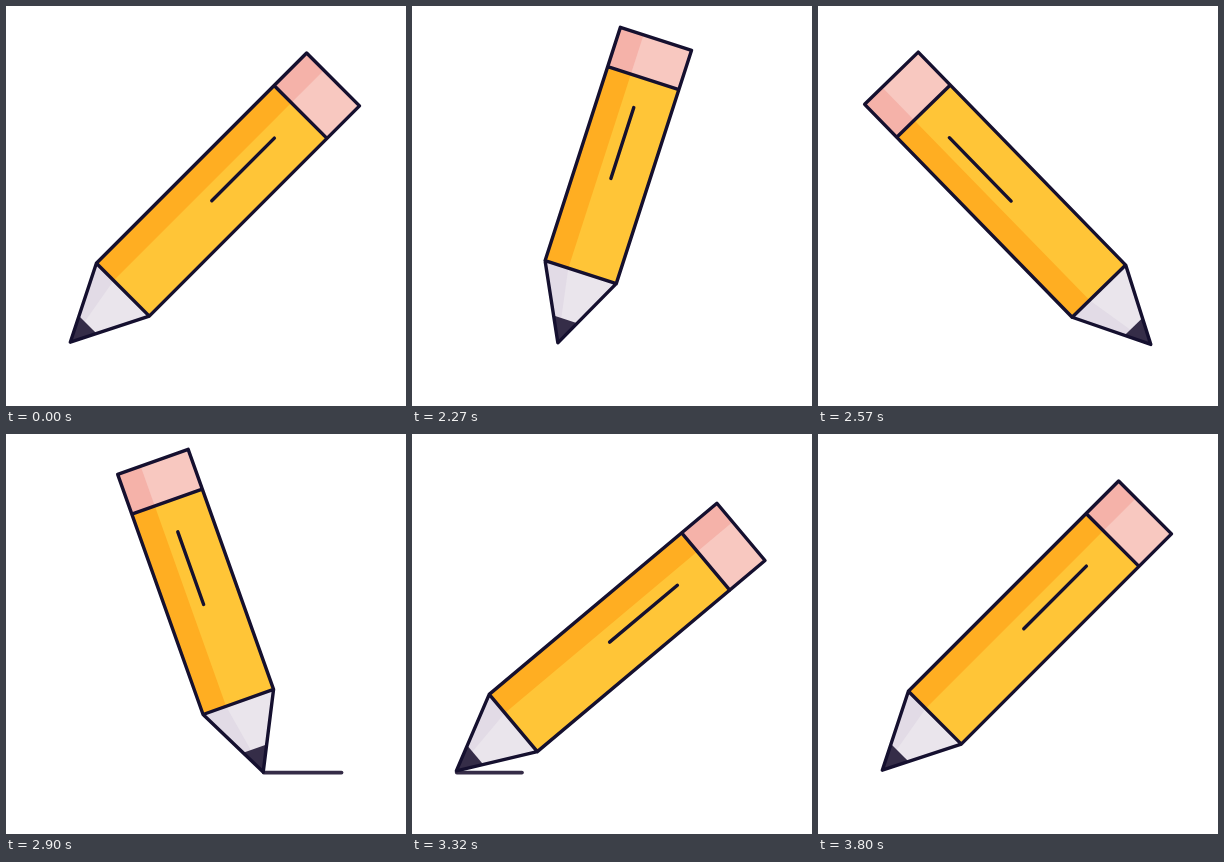
An HTML page for the animation above (3830 ms loop, 400 by 400 pixels).

```html
<!DOCTYPE html>
<html lang="en">
<head>
<meta charset="utf-8">
<title>Pencil</title>
<style>
  html, body { margin: 0; width: 100%; height: 100%; overflow: hidden; background: #fff; }
  svg { display: block; width: 100vw; height: 100vh; }
  .ink { fill: none; stroke: #15102f; stroke-width: 3.4; stroke-linecap: round; stroke-linejoin: round; }
</style>
</head>
<body>
<svg viewBox="0 0 400 400">
  <path id="trail" fill="none" stroke="#352c47" stroke-width="3.8" stroke-linecap="round"/>
  <g id="pencil">
    <path id="body" fill="#ffc537"/>
    <path id="bodyShade" fill="#ffae22"/>
    <path id="eraser" fill="#f8c8c0"/>
    <path id="eraserShade" fill="#f5b2a9"/>
    <path id="wood" fill="#eae5ec"/>
    <path id="woodShade" fill="#e2dbe6"/>
    <path id="lead" fill="#352d48"/>
    <path id="outline" class="ink"/>
  </g>
</svg>
<script>
const LOOP = 3830, HOLD = 2000, STEP = 30;
const HALF = 37.4, SHADE = -13, CONE = 74.3, LEAD = 24.7;
const $ = id => document.getElementById(id);
const clamp = v => Math.min(1, Math.max(0, v));
const mix = (a, b, p) => a + (b - a) * p;

// Cubic bezier easing with horizontal handles at x1 and x2
const ease = (x1, x2) => x => {
  if (x <= 0 || x >= 1) return clamp(x);
  let lo = 0, hi = 1;
  for (let i = 0; i < 30; i++) {
    const t = (lo + hi) / 2, s = 1 - t;
    if (3 * s * s * t * x1 + 3 * s * t * t * x2 + t * t * t < x) lo = t; else hi = t;
  }
  return lo * lo * (3 - 2 * lo);
};
const swing = ease(0.52, 0.68), settle = ease(0.33, 0.67);

const SQUASH = 87, TURN = 20, BACK = 43.5, END = 60;
const REST = { x: 64.3, y: 336.2, angle: 45 };
const RIGHT = { x: 335, y: 338.4, angle: -45 };
const LEFT = { x: 44.3, y: 336.8, angle: 50 };
const MOVES = [
  { start: 0, end: TURN, from: REST, to: RIGHT, curve: swing, squash: SQUASH },
  { start: TURN, end: BACK, from: RIGHT, to: LEFT, curve: swing, squash: SQUASH },
  { start: BACK, end: END, from: LEFT, to: REST, curve: settle, squash: 0 }
];

function poseAt(k) {
  const m = MOVES.find(m => k <= m.end);
  const p = m.curve((k - m.start) / (m.end - m.start));
  const at = key => mix(m.from[key], m.to[key], p);
  return { x: at('x'), y: at('y'), angle: at('angle'),
           squash: m.squash * Math.pow(Math.abs(Math.sin(Math.PI * p)), 2.4) };
}

const poly = (...pts) => 'M' + pts.map(([x, up]) => `${x.toFixed(2)} ${(-up).toFixed(2)}`).join('L') + 'Z';
const box = (l, r, low, high) => poly([l, low], [r, low], [r, high], [l, high]);
const set = (id, d) => $(id).setAttribute('d', d);

// The tip is the origin and the pencil points down
function drawPencil({ x, y, angle, squash }) {
  const band = CONE + 251.3 - 0.9 * squash;
  const top = band + 46 - 0.09 * squash;
  const groove = CONE + 125.8 - 0.52 * squash;
  const grooveTop = groove + 88.5 - 0.265 * squash;
  const leadHalf = HALF * LEAD / CONE;
  set('body', box(-HALF, HALF, CONE, band));
  set('bodyShade', box(-HALF, SHADE, CONE, band));
  set('eraser', box(-HALF, HALF, band, top));
  set('eraserShade', box(-HALF, SHADE, band, top));
  set('wood', poly([0, 0], [HALF, CONE], [-HALF, CONE]));
  set('woodShade', poly([0, 0], [SHADE, CONE], [-HALF, CONE]));
  set('lead', poly([0, 0], [leadHalf, LEAD], [-leadHalf, LEAD]));
  set('outline',
    poly([0, 0], [HALF, CONE], [HALF, top], [-HALF, top], [-HALF, CONE]) +
    `M${-HALF} ${-CONE}H${HALF}M${-HALF} ${-band}H${HALF}M0 ${-groove}V${-grooveTop}`);
  $('pencil').setAttribute('transform', `translate(${x} ${y}) rotate(${angle})`);
}

function drawTrail(k) {
  const head = poseAt(Math.min(k, BACK)).x + 0.5;
  const tail = mix(RIGHT.x + 0.5, LEFT.x + 1, swing((k - 30) / 19));
  const visible = k > TURN && tail > head + 0.6;
  set('trail', visible ? `M${head} 338.6H${tail}` : '');
}

function render(time) {
  const k = Math.max(0, Math.floor((time % LOOP - HOLD) / STEP));
  drawPencil(poseAt(k));
  drawTrail(k);
}

const begin = performance.now();
function tick() {
  render(performance.now() - begin);
  requestAnimationFrame(tick);
}
tick();
</script>
</body>
</html>
```
